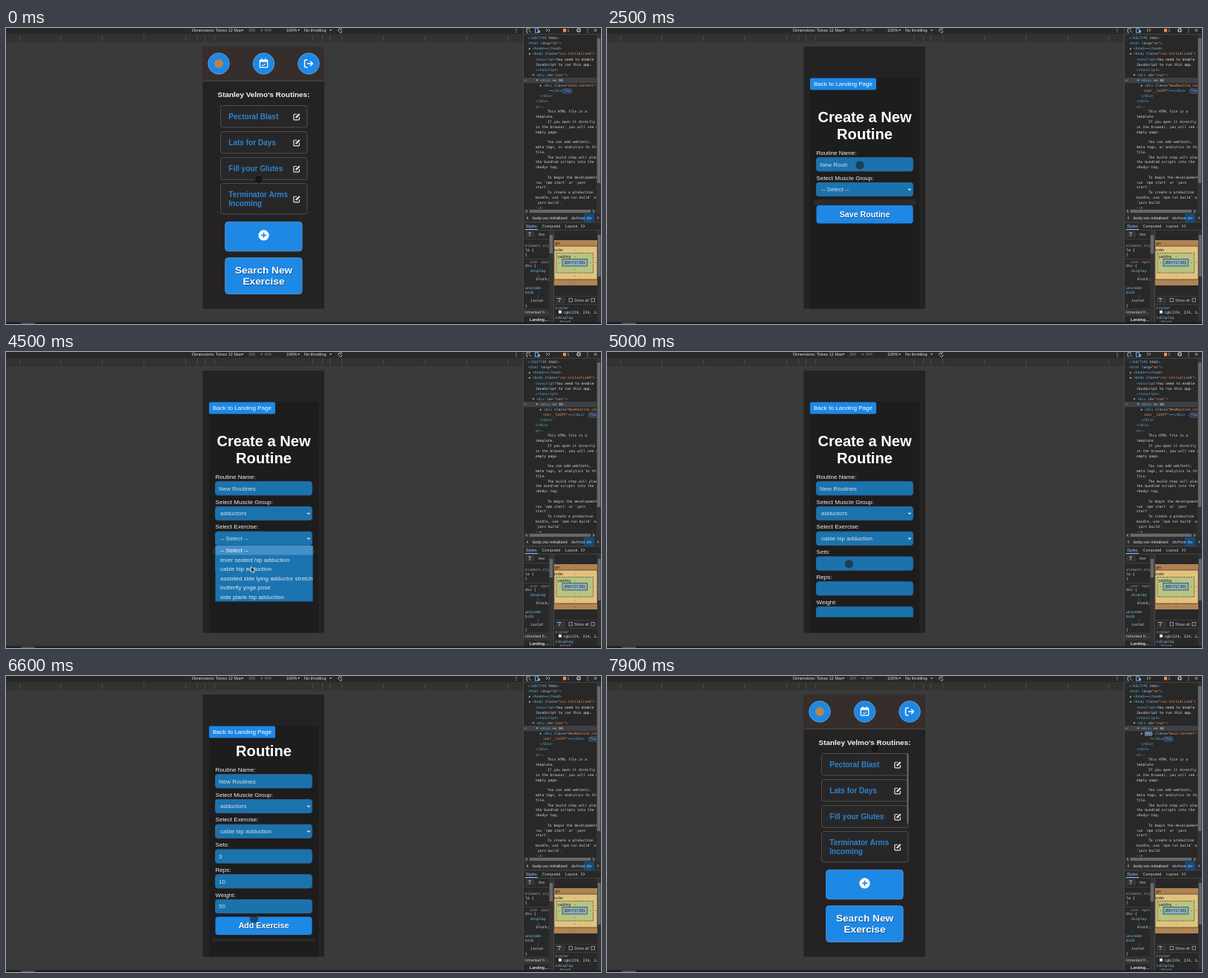
An HTML page that plays this animation: 800 px wide and 399 px high, repeating every 8000 ms.

```html
<!DOCTYPE html>
<html lang="en">
<head>
<meta charset="utf-8">
<title>Workout routine builder</title>
<style>
html, body { margin: 0; width: 100%; height: 100%; overflow: hidden; background: #3a3a3a; }
svg { display: block; width: 800px; height: 399px; font-family: "Liberation Sans", Arial, sans-serif; }
.mono { font-family: "DejaVu Sans Mono", "Liberation Mono", monospace; }
</style>
</head>
<body>
<svg viewBox="0 0 800 399">
  <defs>
    <clipPath id="formClip"><rect x="265" y="87" width="163" height="270.5"/></clipPath>
    <clipPath id="treeClip"><rect x="696" y="9" width="98" height="235"/></clipPath>
    <clipPath id="stylesClip"><rect x="696" y="272" width="34" height="125"/></clipPath>
    <clipPath id="boxClip"><rect x="737" y="272" width="58" height="125"/></clipPath>
    <clipPath id="menuClip"><rect x="270" y="200" width="160" height="196.5"/></clipPath>
  </defs>
  <g id="shell"></g>
  <g id="tree" class="mono" clip-path="url(#treeClip)"></g>
  <g id="page"></g>
  <rect y="396.5" width="800" height="2.5" fill="#1c1c22"/>
  <rect x="20" y="397" width="19" height="2" fill="#4a4a50"/>
  <g id="pointer"></g>
</svg>
<script>
const LOOP = 8000;
const BLUE = '#1e88e5', FIELD = '#1b73ae';
const $ = id => document.getElementById(id);
const esc = s => s.replace(/&/g, '&amp;').replace(/</g, '&lt;').replace(/>/g, '&gt;');

const rect = (x, y, w, h, fill, extra = '') =>
  `<rect x="${x}" y="${y}" width="${w}" height="${h}" fill="${fill}" ${extra}/>`;
const circle = (x, y, r, fill, extra = '') =>
  `<circle cx="${x}" cy="${y}" r="${r}" fill="${fill}" ${extra}/>`;
const path = (d, color, width = 1, extra = '') =>
  `<path d="${d}" fill="none" stroke="${color}" stroke-width="${width}" ${extra}/>`;
// y is the vertical middle of the line
const text = (x, y, s, size, fill = '#eee', extra = '') =>
  `<text x="${x}" y="${(y + size * 0.35).toFixed(2)}" font-size="${size}" fill="${fill}" ${extra}>${esc(s)}</text>`;
const MID = 'text-anchor="middle"', BOLD = 'font-weight="700"';
const heading = (y, s, size) => text(346.5, y, s, size, '#fff', `${MID} ${BOLD}`);
const shadowed = (y, s, size) =>
  text(347.2, y + 0.8, s, size, '#0d4d86', `${MID} ${BOLD}`) + heading(y, s, size);

function shell() {
  const grey = '#c8c8c8', orange = '#f0914f';
  let s = rect(0, 0, 800, 399, '#3a3a3a') + rect(0, 0, 696, 8.5, '#282828') + rect(0, 9, 696, 8.5, '#323232')
    + rect(0, 17.5, 696, 1, '#2c2c2c');
  for (const d of [66, 79, 89, 105, 161, 217, 273, 328])
    s += rect(346 - d, 9.5, 1, 8, '#4a4a4a') + rect(346 + d, 9.5, 1, 8, '#4a4a4a');
  const bar = [[250, 'Dimensions: Tolvex 12 Max'], [377, '100%'], [401, 'No throttling']];
  for (const [x, label] of bar) s += text(x, 3.2, label, 5.5, '#dedede');
  for (const x of [318, 393.5, 436.5]) s += `<path d="M${x - 1.6} 2.3h3.2l-1.6 2z" fill="${grey}"/>`;
  s += text(326, 3.2, '390', 5.3, '#8c8c8c') + text(342, 3.2, '×', 5.5, grey) + text(348, 3.2, '844', 5.3, '#8c8c8c');
  s += path('M446 3l2-2 4 4-2 2zM449 1l3 0', grey, 0.8);
  s += rect(685.5, 1, 1, 1, grey) + rect(685.5, 3, 1, 1, grey) + rect(685.5, 5, 1, 1, grey);

  s += rect(695, 0, 105, 399, '#282828') + rect(695, 0, 1, 399, '#484848') + rect(696, 8, 104, 1, '#444');
  s += path('M705 1h-5v5h2M703 3l3 3', grey, 0.8) + rect(711.5, 0.8, 4, 5.4, 'none', 'stroke="#6ea8f5"')
    + rect(716, 3, 2, 3.4, '#6ea8f5') + path('M726 1l2 2-2 2M729 1l2 2-2 2', grey, 0.8)
    + rect(749, 1, 4, 4.5, orange) + text(754.5, 3.2, '1', 5, grey)
    + circle(770, 3, 2.1, 'none', 'stroke="#c8c8c8" stroke-width="1.3"')
    + rect(781.5, 0.5, 1, 1, grey) + rect(781.5, 2.7, 1, 1, grey) + rect(781.5, 5, 1, 1, grey)
    + path('M790.5 1l4 4m0-4l-4 4', grey, 0.8);
  s += rect(794, 9, 6, 242, '#333') + rect(794.8, 14, 4.4, 195, '#686868');
  s += rect(696, 244, 98, 6, '#333') + rect(704, 245, 82, 4, '#686868')
    + path('M701 245.5l-2 1.5 2 1.5M789 245.5l2 1.5-2 1.5', grey, 0.8);

  s += rect(696, 250, 104, 12, '#2d2d2d') + rect(777, 250, 14, 12, '#144a78')
    + path('M702 254.5l-2 1.5 2 1.5M795 254.5l2 1.5-2 1.5', grey, 0.8)
    + text(708, 255.8, 'body.vsc-initialized', 5.6, '#dcdcdc') + text(760, 255.8, 'div#root', 5.2, '#a9c7ee')
    + text(780.5, 255.8, 'div', 5.6, '#9cc4f5') + rect(696, 261.5, 104, 1, '#484848');
  s += text(699, 266.8, 'Styles', 5.4, '#a8c7fa') + text(720.5, 266.8, 'Computed', 5.4, grey)
    + text(752, 266.8, 'Layout', 5.4, grey) + path('M773 265l2 2-2 2M776 265l2 2-2 2', grey, 0.8)
    + rect(698, 271, 17, 1.2, '#8ab4f8') + rect(696, 272, 104, 0.8, '#484848');

  let css = rect(698, 274, 13, 8, '#353535') + path('M702 276h4l-2 2v3', grey, 0.8)
    + text(715, 277.8, ':hov', 5, grey) + rect(696, 284, 34, 0.7, '#484848');
  const rules = [[698, 293, 'element.sty', '#999'], [698, 299, 'le {'], [698, 305.5, '}'],
    [704, 315, 'user agen', '#888'], [698, 320.5, 'div {'], [705, 327, 'display', '#7cc6ee'], [714, 333, ':'],
    [713, 338, 'block;'], [698, 350, 'unicode-', '#7cc6ee'], [698, 356, 'bidi', '#7cc6ee'], [714, 361.5, ':'],
    [705, 367.5, 'isolat'], [698, 374, '}']];
  for (const [x, y, line, color = '#d8d8d8'] of rules) css += text(x, y, line, 4.9, color, 'class="mono"');
  css += rect(696, 311, 34, 0.7, '#484848') + rect(696, 378, 34, 11, '#333')
    + text(698, 383.5, 'Inherited fr…', 5.5, grey) + text(704, 393.5, 'Landing…', 5.2, '#ddd', BOLD);
  s += `<g clip-path="url(#stylesClip)">${css}</g>`;
  s += rect(730, 273, 6, 124, '#333') + rect(730.8, 279, 4.4, 25, '#686868') + rect(736, 273, 1, 124, '#484848');

  const dashed = 'stroke="#333" stroke-width=".7" stroke-dasharray="2 1.2"';
  let box = rect(737, 286, 58, 61, '#b08354') + rect(737, 294, 58, 45, '#e2c27d', 'stroke="#3a2d1c" stroke-width=".7"')
    + rect(740, 303.5, 49.5, 26.5, '#b7c483', dashed) + rect(748, 311.5, 33.5, 9.5, '#88b0bd', 'stroke="#333" stroke-width=".7"')
    + text(764.5, 316.3, '390×717.391', 4.8, '#222', MID) + text(729, 290.3, 'margin', 5.3, '#222')
    + text(734, 299, 'border', 5.3, '#222') + text(742, 308, 'padding', 4.8, '#222');
  for (const y of [290, 299, 308, 325.5, 334, 343]) box += text(765, y, '-', 5, '#222', MID);
  for (const x of [744.5, 785.5, 792]) box += text(x, 316.3, '-', 5, '#222', MID);
  box += rect(737, 361, 58, 0.7, '#484848') + rect(739, 363, 13, 8, '#353535')
    + path('M741 364.5h5l-2 2v3', grey, 0.8) + rect(757, 364.5, 4.5, 4.5, 'none', 'stroke="#aaa" stroke-width=".8"')
    + text(764, 366.8, 'Show all', 5.2, grey) + rect(787, 364.5, 4.5, 4.5, 'none', 'stroke="#aaa" stroke-width=".8"')
    + rect(737, 372, 58, 0.7, '#484848');
  const computed = [[742, 377, 'color', '#7cc6ee'], [749, 383, 'rgb(224, 224, 2…'], [742, 390, 'display', '#7cc6ee'], [745, 396, 'block']];
  for (const [x, y, line, color = '#ddd'] of computed) box += text(x, y, line, 4.9, color, 'class="mono"');
  box += rect(743, 380.7, 4, 4, '#e0e0e0') + path('M739 376l1.5 1.5-1.5 1.5M739 389l1.5 1.5-1.5 1.5', grey, 0.7);
  s += `<g clip-path="url(#boxClip)">${box}</g>` + rect(795, 273, 5, 124, '#333') + rect(795.6, 279, 4, 56, '#686868');
  return s;
}

const COMMENT = ['<!--', '  This HTML file is a', 'template.', '  If you open it directly', 'in the browser, you will see an',
  'empty page.', '', '  You can add webfonts,', 'meta tags, or analytics to this', 'file.', '  The build step will place',
  'the bundled scripts into the', '<body> tag.', '', '  To begin the development,', 'run `npm start` or `yarn', 'start`.',
  '  To create a production', 'bundle, use `npm run build` or', '`yarn build`.', '-->'];

function markup(x, y, line) {
  let last = 0, out = '';
  const token = /("[^"<>]*"?|\w+")|(<\/?!?\w+|>)|([\w-]+(?==))/g;
  for (const m of line.matchAll(token)) {
    const color = m[1] ? '#f29560' : m[2] ? '#62b1de' : '#a3c4ea';
    out += esc(line.slice(last, m.index)) + `<tspan fill="${color}">${esc(m[0])}</tspan>`;
    last = m.index + m[0].length;
  }
  return `<text x="${x}" y="${(y + 1.3).toFixed(2)}" font-size="4.65" fill="#e8e8e8">${out}${esc(line.slice(last))}</text>`;
}

// flashes: which of the two nested div tags are highlighted
function tree(onForm, flashes) {
  const rows = [[702, '<!DOCTYPE html>'], [702, '<html lang="en">'], [708, '<head>⋯</head>'],
    [708, '<body class="vsc-initialized">'], [712, '<noscript>You need to enable'], [712, 'JavaScript to run this app.'],
    [712, '</noscript>'], [713, '<div id="root">'], [718, '<div> == $0'],
    [723, onForm ? '<div class="NewRoutine_con' : '<div class="main-content">'],
    onForm ? [722, 'iner__CoSPY">⋯</div>'] : [730, '⋯</div>'], [718, '</div>'], [712, '</div>']];
  let s = rect(696, 67, 98, 7.2, '#3f4043') + text(697, 70.5, '⋯', 5, '#bbb');
  if (flashes[0]) s += rect(717.5, 67.5, 10, 6, '#6a6f99');
  if (flashes[1]) s += rect(723, 74.8, 10, 6, '#6a6f99');
  rows.forEach(([x, line], i) => s += markup(x, 13.8 + 7.1 * i, line));
  for (const [x, i, open] of [[704, 2, 0], [704, 3, 1], [709, 7, 1], [714, 8, 1], [719, 9, 0]]) {
    const y = 13.8 + 7.1 * i;
    s += `<path d="${open ? `M${x - 1.5} ${y - 1}h3l-1.5 2.2z` : `M${x - 1} ${y - 1.5}v3l2.2-1.5z`}" fill="#bbb"/>`;
  }
  const badge = onForm ? 783 : 748;
  s += rect(badge, 82, 13, 6, '#26364f', 'rx="3" stroke="#5b7fb5" stroke-width=".6"') + text(badge + 2, 85, 'flex', 3.8, '#a8c7fa');
  COMMENT.forEach((line, i) =>
    s += text(line[0] === ' ' ? 728 : 712, 106 + 6.8 * i, line.trim(), 4.65, '#dadada'));
  return s;
}

function landing(hoverPlus, scrollbar) {
  const ring = 'stroke="#6fa8d8" stroke-width=".8"';
  let s = rect(264.5, 25, 163.5, 353.5, '#242223') + rect(264.5, 25, 163.5, 46, '#352e2c') + rect(264.5, 71, 163.5, 1, '#4b4846');
  for (const x of [286, 346.5, 407]) s += circle(x, 48, 14.3, BLUE, ring);
  s += circle(286, 48, 6, '#b98350');
  s += rect(341.3, 43.2, 10.4, 10, 'none', 'stroke="#fff" stroke-width="1.3" rx="1"') + rect(341.3, 43.2, 10.4, 2.6, '#fff')
    + path('M344 41.3v3M349 41.3v3', '#fff', 1.3) + path('M344 49.5l2 1.4 3.2-2.8', '#fff', 1);
  s += path('M405.5 43h-2.6q-1.4 0-1.4 1.4v7.2q0 1.4 1.4 1.4h2.6M405 48h6.8M409 44.7l3.3 3.3-3.3 3.3', '#fff', 1.5);
  s += text(346.5, 89.5, "Stanley Velmo's Routines:", 9.95, '#f2f2f2', `${MID} ${BOLD}`);
  const cards = [[104.5, 29.5, ['Pectoral Blast']], [139.5, 29.5, ['Lats for Days']], [174.5, 30, ['Fill your Glutes']],
    [209.5, 41.5, ['Terminator Arms', 'Incoming']]];
  for (const [y, h, lines] of cards) {
    const mid = y + h / 2;
    s += rect(288.5, y, 116.5, h, '#282728', 'rx="3" stroke="#4c4c4c" stroke-width="1"');
    lines.forEach((line, i) => s += text(299.3, mid - 0.2 + 12 * (i - (lines.length - 1) / 2), line, 10.05, '#2d83d0', BOLD));
    s += path(`M391 ${mid - 3}h-3.2q-1 0-1 1v5.6q0 1 1 1h5.6q1 0 1-1v-2.8`, '#e6e6e6', 1.2)
      + path(`M389.6 ${mid + 1.8}l5-5`, '#e6e6e6', 2.3);
  }
  if (scrollbar) s += rect(403.3, 104, 2, 95, '#6c6c6c', 'rx="1"');
  const edge = 'rx="4" stroke="#5c9fd9" stroke-width=".8"';
  s += rect(294.7, 261.3, 103.4, 39.5, hoverPlus ? '#1976d2' : BLUE, edge) + circle(346.5, 279.4, 7.1, '#fff')
    + path('M342.9 279.4h7.2M346.5 275.8v7.2', BLUE, 1.6);
  s += rect(294.7, 309.8, 103.4, 48.7, BLUE, edge) + shadowed(326.2, 'Search New', 13.6) + shadowed(341.3, 'Exercise', 13.6);
  return s;
}

function field(y, label, value, isSelect) {
  return text(281.5, y, label, 8.1, '#f0f0f0')
    + rect(281.5, y + 6.7, 129.8, 18.2, FIELD, 'rx="3" stroke="#2b6797" stroke-width="1"')
    + text(isSelect ? 288 : 286, y + 15.8, value, 8, '#d6dde2')
    + (isSelect ? path(`M405 ${y + 14.8}l1.9 1.9 1.9-1.9`, '#e8e8e8', 1.1) : '');
}
const button = (y, label) => rect(281.5, y, 130, 24.5, BLUE, 'rx="4"') + shadowed(y + 12.2, label, 10.7);

const TITLE_ROWS = [120, 143], FIRST = 168, STEP = 33.75;
const SELECT = '-- Select --';

function form(state) {
  let s = '', y = FIRST;
  ['Create a New', 'Routine'].forEach((line, i) => s += heading(TITLE_ROWS[i], line, 20.1));
  for (const [label, value, isSelect] of state.fields) {
    s += field(y, label, value, isSelect);
    y += STEP;
  }
  if (state.caret !== null) {
    const [row, x] = state.caret;
    s += rect(x, FIRST + STEP * row + 11, 0.8, 9.5, '#eee');
  }
  let bottom = y - STEP + 25;
  if (state.adding) {
    s += button(bottom + 4.7, 'Add Exercise');
    bottom += 29.5;
  }
  if (state.added) {
    s += rect(277.5, bottom + 4, 138, 66, '#272627', 'rx="4"') + rect(281.5, bottom + 8, 130, 57.5, '#373536', 'rx="3"')
      + text(285, bottom + 24, 'cable hip adduction', 8.1, '#fff')
      + text(285, bottom + 49.5, 'Sets: 3, Reps: 10, Weight: 50', 8.1, '#fff') + button(bottom + 70, 'Save Routine');
  } else {
    s += rect(277.5, bottom + 4.5, 138, 8, '#2b2a2b', 'rx="3"') + button(bottom + 12.3, 'Save Routine');
  }
  return rect(264.5, 25, 163.5, 353.5, '#242324') + rect(273, 67, 147, 311.5, '#1d1d1e')
    + rect(273, 67.5, 89, 16, BLUE, 'rx="2"') + text(317.5, 75.5, 'Back to Landing Page', 8.1, '#fff', MID)
    + `<g clip-path="url(#formClip)"><g transform="translate(0 ${-state.scroll.toFixed(2)})">${s}</g></g>`;
}

function menu(top, items, active, width) {
  let s = rect(281.5, top, width, items.length * 12.55, '#1b74b0');
  items.forEach((item, i) => {
    const y = top + 12.55 * i;
    if (i === active) s += rect(281.5, y, width, 12.55, '#438fca');
    s += text(288, y + 6.4, item, 8, i === active ? '#fff' : '#dce7ef');
  });
  return `<g clip-path="url(#menuClip)">${s}</g>`;
}
const MUSCLES = [SELECT, 'abductors', 'abs', 'adductors', 'biceps', 'calves', 'cardiovascular system', 'delts', 'forearms',
  'glutes', 'hamstrings', 'lats', 'levator scapulae', 'pectorals'];
const EXERCISES = [SELECT, 'lever seated hip adduction', 'cable hip adduction', 'assisted side lying adductor stretch',
  'butterfly yoga pose', 'side plank hip adduction'];

// time, x, y
const ROUTE = [[0, 340, 204], [150, 341, 208], [650, 350, 288], [950, 355, 292], [1300, 357, 294], [1750, 340, 185],
  [2750, 340, 185], [3100, 338, 218], [3220, 338, 220], [3400, 335, 284], [3620, 332, 272], [3800, 332, 272], [4100, 332, 252],
  [4250, 332, 254], [4500, 331, 293], [4750, 331, 293], [5050, 325, 285], [5350, 325, 285], [5550, 324, 318], [5850, 324, 318],
  [6050, 321, 309], [6450, 321, 309], [6700, 340, 337], [6950, 341, 337], [7400, 362, 277], [7500, 363, 279], [7660, 363, 277],
  [7900, 360, 98], [8000, 359, 96]];

const ramp = (t, a, b) => Math.min(1, Math.max(0, (t - a) / (b - a)));
const ease = p => p * p * (3 - 2 * p);
const typed = (s, t, start, gap) => s.slice(0, Math.max(0, Math.floor((t - start) / gap) + 1));

function pointer(t) {
  const i = Math.max(1, ROUTE.findIndex(p => p[0] > t));
  const [a, b] = [ROUTE[i - 1], ROUTE[i]], p = ease(ramp(t, a[0], b[0]));
  const x = a[1] + (b[1] - a[1]) * p, y = a[2] + (b[2] - a[2]) * p;
  if (menuOpen(t))
    return `<path transform="translate(${x - 1.5} ${y - 4})" d="M0 0v8l1.9-1.7 1.2 2.7 1.2-.6-1.2-2.5h2.5z" fill="#111" stroke="#fff" stroke-width=".7"/>`;
  const overBlue = t > 1650 && t < 7680;
  return circle(x, y, 5.6, '#151515', `fill-opacity="${overBlue ? 0.55 : 0.9}" stroke="#444" stroke-opacity=".6" stroke-width=".8"`);
}
const menuOpen = t => t >= 3200 && t < 3800 ? 'muscle' : t >= 4200 && t < 4750 ? 'exercise' : '';

function formState(t) {
  const adding = t >= 4750 && t < 6900, added = t >= 6900;
  const fields = [['Routine Name:', typed('New Routines', t, 1920, 65)],
    ['Select Muscle Group:', t < 3800 ? SELECT : 'adductors', true]];
  if (t >= 3800) fields.push(['Select Exercise:', adding ? 'cable hip adduction' : SELECT, true]);
  if (adding) fields.push(['Sets:', typed('3', t, 5250, 100)], ['Reps:', typed('10', t, 5630, 90)],
    ['Weight:', typed('50', t, 6250, 120)]);
  let caret = null;
  if (t > 1800 && t < 1920) caret = [0, 286];
  else if (t > 5060 && t < 5250) caret = [3, 286];
  else if (t > 6060 && t < 6250) caret = [5, 286];
  return { fields, caret, adding, added, scroll: added ? 68 : 42 * ease(ramp(t, 5830, 5980)) };
}

function page(t) {
  if (t < 1000 || t >= 7700) return landing(t > 500 && t < 1000, t >= 7700);
  let s = form(formState(t));
  const open = menuOpen(t);
  if (open === 'muscle') s += menu(227, MUSCLES, t < 3500 ? 0 : 3, 129.5);
  if (open === 'exercise') s += menu(261, EXERCISES, t < 4580 ? 0 : 2, 131);
  return s;
}

const shown = {};
function put(id, html) {
  if (shown[id] !== html) $(id).innerHTML = shown[id] = html;
}
function render(now) {
  const t = now % LOOP;
  const opened = t >= 1000 && t < 1900, returned = t >= 7700;
  put('tree', tree(t >= 1000 && t < 7700, [opened, opened || returned]));
  put('page', page(t));
  put('pointer', pointer(t));
  requestAnimationFrame(() => render(performance.now() - start));
}

put('shell', shell());
const start = performance.now();
render(0);
</script>
</body>
</html>
```
